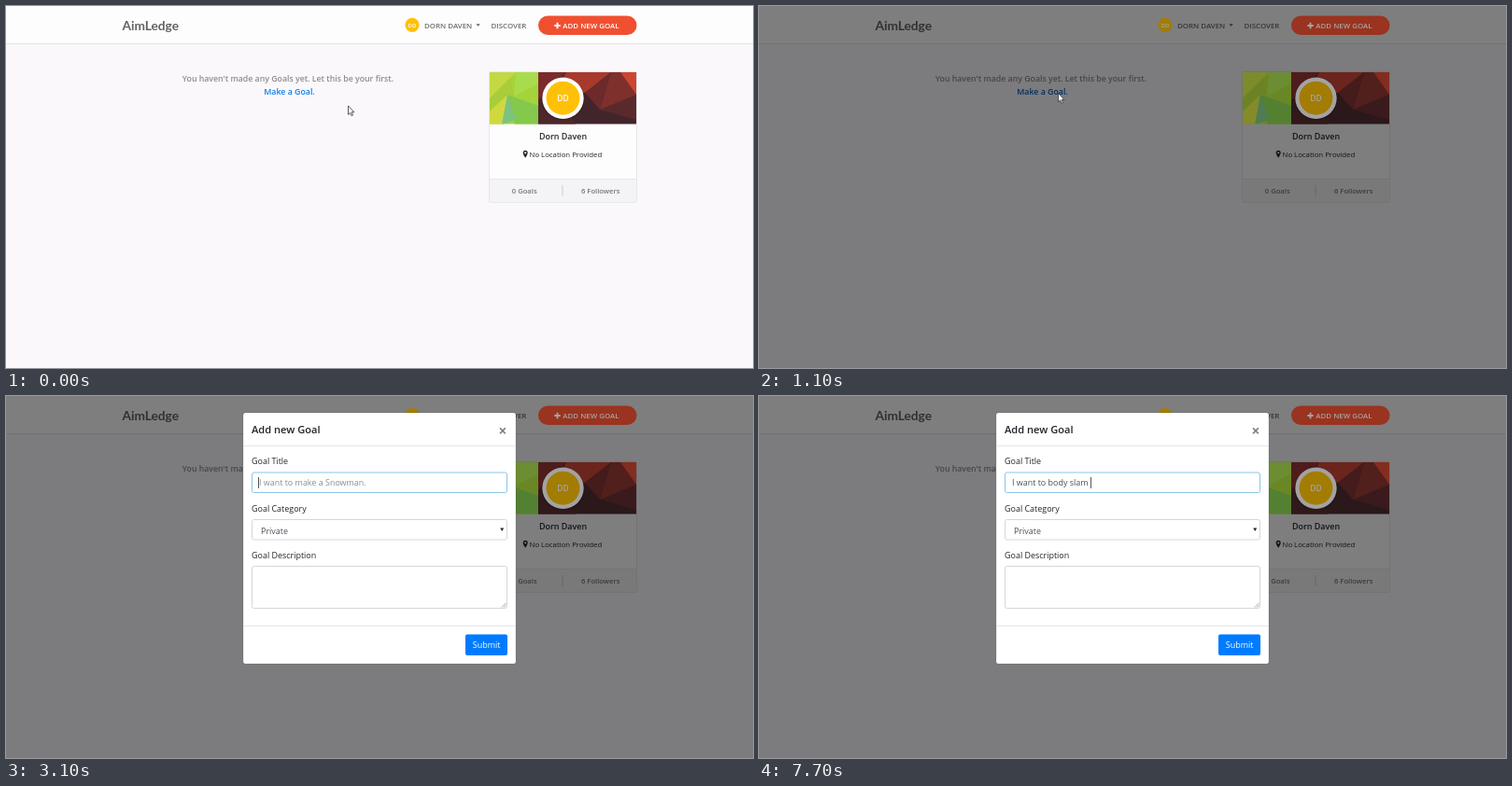
Animation of 800x388 px, one loop 8 s. Source, as an HTML page:

```html
<!DOCTYPE html>
<html lang="en">
<head>
<meta charset="utf-8">
<title>Add a goal</title>
<style>
  html, body { margin: 0; width: 100%; height: 100%; overflow: hidden; background: #faf8fb; }
  svg { display: block; width: 100vw; height: 100vh; }
  text { font-family: "Open Sans", "Noto Sans", sans-serif; font-size: 8.95px; fill: #212529; white-space: pre; }
  .semi { font-weight: 600; }
  .mid { text-anchor: middle; }
  .nav { font-size: 7.9px; font-weight: 600; fill: #6c6c6c; }
  .brand { font: 700 13.7px Lato, sans-serif; fill: #626262; }
  .count { font-size: 7.65px; font-weight: 600; fill: #777; }
  .white { fill: #fff; }
  .muted { fill: #868e96; }
  .entry { fill: #495057; }
  .field { fill: #fff; stroke: #d3d7dc; }
  .rule { stroke: #e4e6e9; }
</style>
</head>
<body>
<svg viewBox="0 0 800 388">
  <defs>
    <clipPath id="coverClip"><rect x="518" y="71" width="157" height="55.5"/></clipPath>
  </defs>

  <g id="page">
    <rect width="800" height="388" fill="#faf8fb"/>
    <rect width="800" height="40" fill="#fefdfe"/>
    <path d="M0 40.5H800" stroke="#e3e2e5"/>
    <text class="brand" x="124.500" y="25.500">AimLedge</text>
    <text class="nav" x="448" y="23.500">DORN DAVEN</text>
    <path d="M503.300 19.200h4.600l-2.300 2.500z" fill="#666"/>
    <text class="nav" x="519.500" y="23.500">DISCOVER</text>

    <text class="semi mid" x="302" y="81" style="font-size:8.75px;fill:#8c8c8e">You haven't made any Goals yet. Let this be your first.</text>
    <text id="link" class="semi mid" x="303.500" y="95" style="font-size:8.8px">Make a Goal.</text>

    <rect x="517.500" y="70.500" width="158" height="140" rx="1.500" fill="#fefdfe" stroke="#e7e6e9"/>
    <path d="M518 185.500H675V210H518z" fill="#f4f3f5"/>
    <path d="M518 185.500H675" stroke="#e7e6e9"/>
    <path d="M596 192v12" stroke="#d0cfd2"/>
    <text class="semi mid" x="596.500" y="143">Dorn Daven</text>
    <path d="M556.200 162.800C554.500 160 553.700 158.700 553.700 157.300a2.500 2.500 0 0 1 5 0C558.700 158.700 557.900 160 556.200 162.800zM556.200 156.200a1.100 1.100 0 1 0 .01 0z" fill="#212529" fill-rule="evenodd"/>
    <text x="560.500" y="161.500" style="font-size:7.8px">No Location Provided</text>
    <text class="count" x="541.800" y="201">0 Goals</text>
    <text class="count" x="616" y="201">6 Followers</text>
  </g>

  <rect id="backdrop" width="800" height="388"/>

  <g id="vivid">
    <circle cx="435" cy="20.300" r="7.600" fill="#ffc107"/>
    <text class="semi mid white" x="435" y="22.500" style="font-size:6px">DD</text>
    <rect x="570" y="10.500" width="105.500" height="20.500" rx="10.250" fill="#f05030"/>
    <path d="M587.300 21h6.400M590.500 17.800v6.400" stroke="#fff" stroke-width="1.900"/>
    <text class="nav" x="596.300" y="23.800" style="fill:#fff">ADD NEW GOAL</text>

    <g clip-path="url(#coverClip)">
      <path d="M518 71h52v56h-52z" fill="#a4d43a"/>
      <path d="M518 71h28l-28 28z" fill="#c3d944"/>
      <path d="M546 71h24v12l-26 14z" fill="#a9dc4c"/>
      <path d="M518 99l22-22 4 20-26 16z" fill="#a8cc3a"/>
      <path d="M518 113l19-18-4 32h-15z" fill="#cfd93e"/>
      <path d="M537 95l33 12v20h-25z" fill="#84c84c"/>
      <path d="M537 95l9 27-15 5z" fill="#7cc281"/>

      <path d="M570 71h105v56h-105z" fill="#41252a"/>
      <path d="M570 71h30l-30 30z" fill="#7c2b2b"/>
      <path d="M600 71h48l-28 22-32 0z" fill="#a83a2d"/>
      <path d="M570 101l18-14 22 40h-40z" fill="#4d272a"/>
      <path d="M620 93l28-22-12 40z" fill="#6c2a2b"/>
      <path d="M648 71l10 0 17 24-27 13-12 3z" fill="#7e302c"/>
      <path d="M658 71h17v24z" fill="#cc4631"/>
      <path d="M636 111l39-16v27z" fill="#5a292b"/>
    </g>
    <circle cx="596.500" cy="99.500" r="23" fill="#000" opacity=".2"/>
    <circle cx="596.500" cy="98.700" r="22.200" fill="#fff"/>
    <circle cx="596.500" cy="98.700" r="18" fill="#ffc107"/>
    <text class="semi mid white" x="596.500" y="101.700" style="font-size:8.5px">DD</text>
  </g>

  <g id="modal">
    <rect x="254" y="18" width="292" height="269" rx="2.500" fill="#fff" stroke="#000" stroke-opacity=".2" stroke-width=".6"/>
    <path class="rule" d="M254 53.500H546M254 246.500H546"/>
    <text class="semi" x="263" y="40.300" style="font-size:11.1px">Add new Goal</text>
    <text class="mid" x="532" y="42.800" style="font-size:15.5px;font-weight:700;fill:#7f7f7f">×</text>

    <text x="263" y="73.300">Goal Title</text>
    <rect id="titleField" class="field" x="263.500" y="82" width="273" height="21.500" rx="2"/>
    <text id="placeholder" class="muted" x="271" y="96.300">I want to make a Snowman.</text>
    <text id="entry" class="entry" x="271" y="96.300"></text>
    <rect id="caret" y="87" width="1" height="12" fill="#555"/>

    <text x="263" y="123.800">Goal Category</text>
    <rect class="field" x="263.500" y="132.500" width="273" height="21.500" rx="2"/>
    <text class="entry" x="273" y="147.800">Private</text>
    <path d="M529.200 141.500h4l-2 3.400z" fill="#222"/>

    <text x="263" y="174.300">Goal Description</text>
    <rect class="field" x="263.500" y="182.500" width="273" height="45" rx="2"/>
    <path d="M531 226.500l4.500-4.500M533.500 226.500l2-2" stroke="#777" stroke-width=".7"/>

    <rect x="492" y="255.500" width="45" height="22.500" rx="2" fill="#007bff"/>
    <text class="mid white" x="514.600" y="270.200">Submit</text>
  </g>

  <path id="pointer" d="M.5 .5v9.300l2.100-1.900 1.500 3.300 1.500-.7-1.500-3.200h2.800z" fill="#fff" stroke="#333" stroke-width=".8"/>
</svg>

<script>
const LOOP = 8000, TICK = 100;
const MESSAGE = "I want to body slam ";
const KEY_TIMES = [3700, 3900, 4100, 4300, 4400, 4600, 4700, 5000, 5100, 5500,
                   5800, 5900, 6300, 6400, 6600, 7000, 7200, 7300, 7300, 7700];
// Each row: start time, value held until the next row.
const DIM = [[0, 0], [900, .03], [1000, .28], [1100, .5]];
const MODAL = [[0, [0, -67]], [1200, [.55, -38]], [1300, [1, -13]], [1400, [1, -1]], [1600, [1, 0]]];

const $ = id => document.getElementById(id);
const held = (steps, t) => steps.filter(step => step[0] <= t).pop()[1];
const show = (id, on) => { $(id).style.visibility = on ? "visible" : "hidden"; };

function draw(t) {
  const move = Math.min(t / 500, 1);
  const eased = move * move * (3 - 2 * move);
  $("pointer").setAttribute("transform", `translate(${366 - 46 * eased} ${106.5 - 13.5 * eased})`);
  show("pointer", t < 1600);
  $("link").style.fill = t >= 400 ? "#005fc4" : "#0a7fee";

  const dim = held(DIM, t);
  $("backdrop").style.opacity = dim;
  $("vivid").style.filter = dim ? `brightness(${1 - dim * .72})` : "none";

  const [opacity, shift] = held(MODAL, t);
  $("modal").style.opacity = opacity;
  $("modal").setAttribute("transform", `translate(0 ${shift})`);

  const typed = MESSAGE.slice(0, KEY_TIMES.filter(time => time <= t).length);
  $("entry").textContent = typed;
  show("placeholder", !typed);
  $("titleField").style.stroke = t >= 2100 ? "#8cc3e6" : "";
  const width = typed ? $("entry").getComputedTextLength() : -1;
  $("caret").setAttribute("x", Math.round(271 + width));
  show("caret", t >= 2200 && !(t >= 2600 && t < 3100));
}

const start = performance.now();
function frame() {
  const t = (performance.now() - start) % LOOP;
  draw(Math.floor(t / TICK) * TICK);
  requestAnimationFrame(frame);
}
frame();
</script>
</body>
</html>
```
